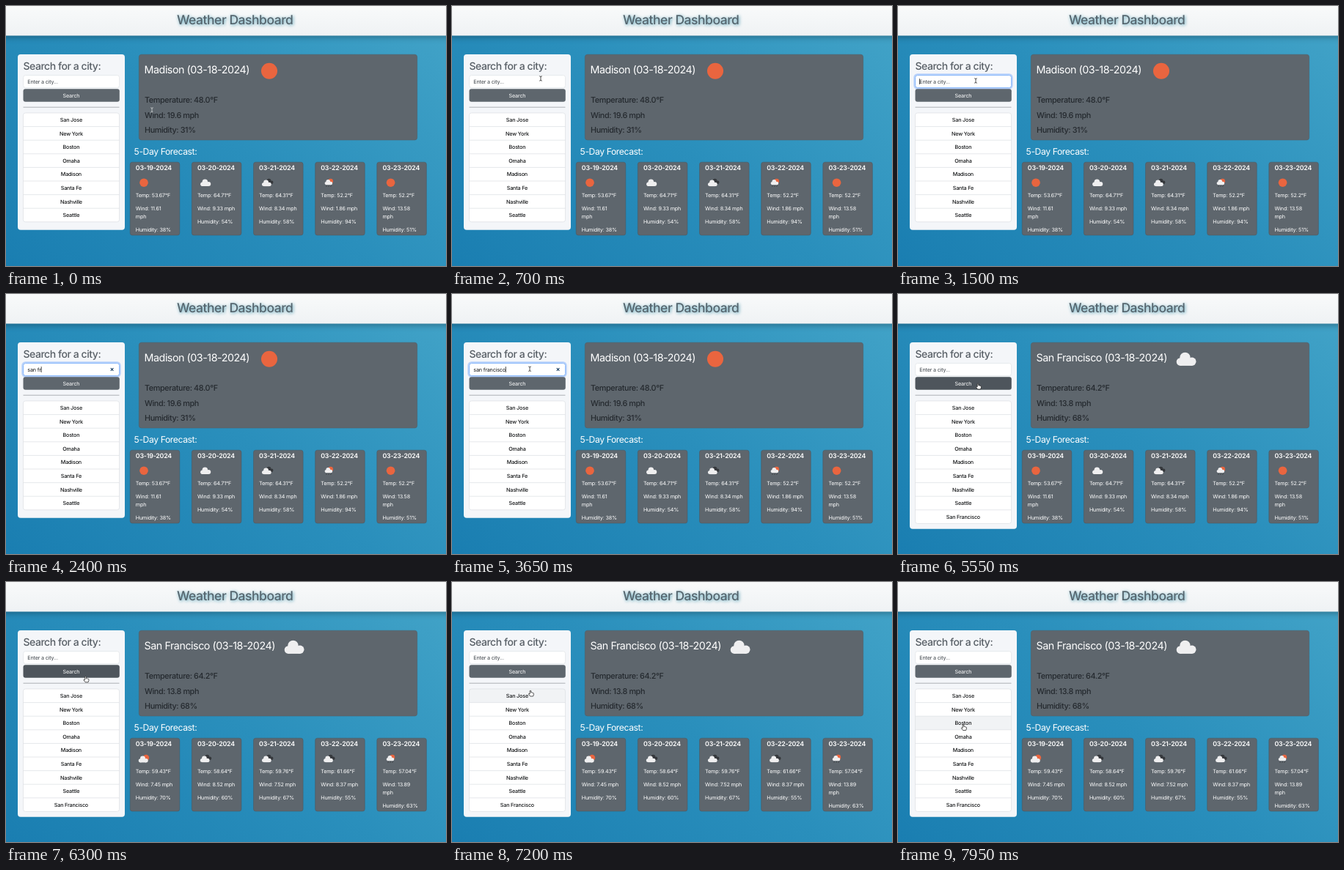
These frames come from a looping animation (600x355 px, 8 s). An HTML page:

```html
<!DOCTYPE html>
<html lang="en">
<head>
<meta charset="utf-8">
<title>Weather Dashboard</title>
<style>
  html, body { margin: 0; width: 100%; height: 100%; overflow: hidden; }
  body { background: linear-gradient(40deg, #1a7eb1, #2a8fbc 50%, #43a4c8); }
  svg { display: block; width: 600px; height: 355px; }
  text {
    font: 400 7.2px Inter, Roboto, sans-serif; font-optical-sizing: none;
    letter-spacing: -.17px; white-space: pre; text-rendering: geometricPrecision;
  }
  .title { font-size: 17.5px; font-weight: 500; letter-spacing: -.47px; fill: #55656e; text-shadow: 1px 1px 4px #4f9db3; }
  .heading { font-size: 14px; font-weight: 500; letter-spacing: -.45px; fill: #575e65; }
  .city { font-size: 14.3px; letter-spacing: -.47px; fill: #fff; }
  .detail { font-size: 10.8px; font-weight: 500; letter-spacing: -.38px; fill: #24292e; }
  .forecast { font-size: 12.2px; letter-spacing: -.42px; fill: #fff; }
  .date { font-size: 8.8px; font-weight: 600; letter-spacing: -.2px; fill: #fff; }
  .light { fill: #fff; }
  .dark { fill: #101214; }
  .row { font-weight: 500; }
  .hint { fill: #3c4248; }
  .middle { text-anchor: middle; }
  .header { filter: drop-shadow(0 2px 4px rgba(0, 0, 0, .3)); }
</style>
</head>
<body>
<svg viewBox="0 0 600 355">
  <defs>
    <linearGradient id="sheen" x2="0" y2="1">
      <stop stop-color="#fbfcfc"/><stop offset="1" stop-color="#eff2f4"/>
    </linearGradient>
  </defs>
  <rect class="header" x="-10" y="-10" width="620" height="50.5" fill="url(#sheen)"/>
  <text class="title middle" x="312.2" y="24.8">Weather Dashboard</text>
  <g id="scene"></g>
</svg>
<script>
const LOOP = 8000;
const FOCUS = 1200, TYPE_START = 1750, KEY_GAP = 125, BLUR = 5000, RESULT = 5350, FORECAST = 5600;
const QUERY = 'san francisco';
const LAST_KEY = TYPE_START + KEY_GAP * (QUERY.length - 1);
const ROW_TOP = 146, ROW_HEIGHT = 18.6;
const GREY = '#5e666d', ORANGE = '#e9653f';
const CITIES = ['San Jose', 'New York', 'Boston', 'Omaha', 'Madison', 'Santa Fe', 'Nashville', 'Seattle'];

const CURRENT = {
  before: { city: 'Madison', icon: 'sun', iconX: 359, temp: '48.0', wind: '19.6', humidity: 31 },
  after: { city: 'San Francisco', icon: 'cloud', iconX: 393, temp: '64.2', wind: '13.8', humidity: 68 }
};
// Each day: icon, temperature, wind, humidity
const DAYS = {
  before: [
    ['sun', '53.67', '11.61', 38], ['cloud', '64.71', '9.33', 54], ['broken', '64.31', '8.34', 58],
    ['shower', '52.2', '1.86', 94], ['sun', '52.2', '13.58', 51]
  ],
  after: [
    ['few', '59.43', '7.45', 70], ['broken', '58.64', '8.52', 60], ['broken', '59.76', '7.52', 67],
    ['broken', '61.66', '8.37', 55], ['shower', '57.04', '13.89', 63]
  ]
};

// Pointer stops: time, x, y
const PATH = [
  [0, 199, 142], [150, 199, 142], [700, 121, 99], [850, 106, 102], [3600, 106, 102], [4350, 109, 122],
  [6100, 109, 122], [6700, 107, 148], [7250, 107, 148], [7700, 89, 194.5], [LOOP, 89, 194.5]
];

const scene = document.getElementById('scene');
const clamp = v => Math.max(0, Math.min(1, v));
const ease = v => v * v * (3 - 2 * v);
const text = (x, y, cls, str) => `<text x="${x}" y="${y}" class="${cls}">${str}</text>`;
const box = (x, y, w, h, r, fill, stroke = 'none', extra = '') =>
  `<rect x="${x}" y="${y}" width="${w}" height="${h}" rx="${r}" fill="${fill}" stroke="${stroke}" ${extra}/>`;
const disc = (x, y, r, fill) => `<circle cx="${x}" cy="${y}" r="${r}" fill="${fill}"/>`;
const place = (x, y, s, body) => `<g transform="translate(${x} ${y}) scale(${s})">${body}</g>`;

const cloud = fill => disc(-4.2, 2, 2.8, fill) + disc(-.8, -1, 3.8, fill) + disc(4.1, 1.8, 3, fill) +
  box(-4.2, 1, 8.3, 3.8, 0, fill);
const white = cloud('#efeff0');
const ICONS = {
  sun: disc(0, 0, 5.8, ORANGE),
  cloud: white,
  broken: place(2.8, -1.8, .75, cloud('#35383c')) + place(-1, .6, .9, white),
  few: disc(3, -1.2, 4.2, ORANGE) + place(-.8, .8, .92, white),
  shower: disc(2.2, -2, 3.4, ORANGE) + place(-.6, -.6, .75, white) +
    '<path d="M-3 3.8l-.8 1.8M0 3.8l-.8 1.8M3 3.8l-.8 1.8" stroke="#35383c" stroke-width=".8"/>'
};

function pointerAt(t) {
  const i = PATH.findIndex((stop, k) => k && t <= stop[0]);
  const [t0, x0, y0] = PATH[i - 1], [t1, x1, y1] = PATH[i];
  const k = ease(clamp((t - t0) / (t1 - t0)));
  return { x: x0 + (x1 - x0) * k, y: y0 + (y1 - y0) * k };
}

function drawPointer({ x, y }, overLink) {
  const overInput = x < 155 && y > 94 && y < 113;
  if (overInput || x > 189) {
    return place(x, y, 1, '<path d="M-1.8-3.2Q0-3.2 0-2Q0-3.2 1.8-3.2M0-2V2M-1.8 3.2Q0 3.2 0 2Q0 3.2 1.8 3.2" ' +
      `fill="none" stroke="${overInput ? '#222' : '#d5d8da'}" stroke-width=".8"/>`);
  }
  const shape = overLink
    ? 'M-.8 .6Q0-.5 .8 .6V3Q1.6 2.4 2.2 3.2Q3 2.8 3.4 3.6Q4.4 3.4 4.4 4.5V5.8L3.6 8H-.4L-2.6 5Q-2.6 3.8-.8 4.8Z'
    : 'M0 0V7.5L1.8 5.9L2.9 8.4L4 7.9L2.9 5.5H5.3Z';
  return place(x, y, 1, `<path d="${shape}" fill="${overLink ? '#fff' : '#111'}" ` +
    `stroke="${overLink ? '#111' : '#fff'}" stroke-width=".7" stroke-linejoin="round"/>`);
}

function drawInput(t) {
  const focus = clamp((t - FOCUS) / 150) * (1 - clamp((t - BLUR) / 150));
  const count = t < TYPE_START || t >= RESULT ? 0
    : Math.min(QUERY.length, Math.floor((t - TYPE_START) / KEY_GAP) + 1);
  const typing = t >= TYPE_START && t < LAST_KEY;
  const blinkStart = t < TYPE_START ? FOCUS : LAST_KEY;
  const caret = t >= FOCUS && t < BLUR && (typing || (t - blinkStart) % 1060 < 530);
  return box(22.5, 93.5, 133, 19, 4, 'none', '#b9d2fb', `stroke-width="2.4" opacity="${focus}"`) +
    box(23.6, 94.6, 131, 17, 3, '#fff', '#dee2e6', 'stroke-width=".7"') +
    box(23.6, 94.6, 131, 17, 3, 'none', '#86b7fe', `opacity="${focus}"`) +
    (count ? `<text id="query" x="29.3" y="105.6" class="dark">${QUERY.slice(0, count)}</text>` +
      '<path d="M142.8 101.2l3.6 3.6m0-3.6l-3.6 3.6" stroke="#1d4266" stroke-width="1.2"/>'
      : text(29.3, 105.6, 'hint', 'Enter a city...')) +
    (caret ? '<path id="caret" d="M29.4 99.2v7.8" stroke="#111" stroke-width=".8"/>' : '');
}

function drawSearch(t, overButton, hoveredRow) {
  const done = t >= RESULT;
  const cities = done ? [...CITIES, 'San Francisco'] : CITIES;
  const height = ROW_HEIGHT * cities.length;
  let out = box(16, 66, 146, done ? 254.7 : 239.7, 4, '#f4f6f9') +
    text(23.4, 87.1, 'heading', 'Search for a city:') + drawInput(t) +
    box(23.5, 113.3, 131.3, 17.4, 3, overButton ? '#4e555c' : GREY) +
    text(89, 124.6, 'light middle', 'Search') +
    '<path d="M23.5 138.2h131" stroke="#8b9197" stroke-width=".7"/>' +
    box(23.5, ROW_TOP, 131, height, 3, '#fff');
  cities.forEach((city, i) => {
    const y = ROW_TOP + i * ROW_HEIGHT;
    if (i === hoveredRow) out += box(23.5, y, 131, ROW_HEIGHT, 1, '#f1f3f5');
    if (i) out += `<path d="M23.5 ${y}h131" stroke="#dcdfe3" stroke-width=".7"/>`;
    out += text(88.9, y + 11.9, 'dark row middle', city);
  });
  return out + box(23.5, ROW_TOP, 131, height, 3, 'none', '#dcdfe3', 'stroke-width=".7"');
}

function drawCurrent({ city, icon, iconX, temp, wind, humidity }) {
  return box(181.3, 66.2, 379.4, 116.8, 3.5, GREY, '#505b63', 'stroke-width=".5"') +
    text(188.6, 92.2, 'city', `${city} (03-18-2024)`) +
    place(iconX, 88.8, 1.9, ICONS[icon]) +
    text(189, 132.4, 'detail', `Temperature: ${temp}°F`) +
    text(189, 153, 'detail', `Wind: ${wind} mph`) +
    text(189, 173.4, 'detail', `Humidity: ${humidity}%`);
}

function drawDay([icon, temp, wind, humidity], i) {
  const x = 169.2 + i * 84.15, left = x + 7.6;
  const wraps = wind.length > 4;
  return box(x, 213.2, 67.6, 99.8, 3, GREY, '#4a555d', 'stroke-width=".5"') +
    text(left, 224, 'date', `03-${19 + i}-2024`) +
    place(x + 18.8, 241.2, 1, ICONS[icon]) +
    text(left, 260.6, 'light', `Temp: ${temp}°F`) +
    text(left, 278.8, 'light', `Wind: ${wind}${wraps ? '' : ' mph'}`) +
    (wraps ? text(left, 289.8, 'light', 'mph') : '') +
    text(left, wraps ? 307.8 : 297, 'light', `Humidity: ${humidity}%`);
}

function draw(t) {
  const pointer = pointerAt(t);
  const hidden = t >= TYPE_START && t < 3600;
  const overButton = pointer.x < 155 && pointer.y > 113.3 && pointer.y < 130.7;
  const hoveredRow = pointer.x < 155 && pointer.y >= ROW_TOP
    ? Math.floor((pointer.y - ROW_TOP) / ROW_HEIGHT) : -1;
  scene.innerHTML = drawSearch(t, overButton, hoveredRow) +
    drawCurrent(t < RESULT ? CURRENT.before : CURRENT.after) +
    text(174.6, 202.8, 'forecast', '5-Day Forecast:') +
    (t < FORECAST ? DAYS.before : DAYS.after).map(drawDay).join('') +
    (hidden ? '' : drawPointer(pointer, overButton || hoveredRow >= 0));

  const query = document.getElementById('query'), caret = document.getElementById('caret');
  if (query && caret) caret.setAttribute('transform', `translate(${query.getComputedTextLength() + .3})`);
}

const start = performance.now();
function tick() {
  draw((performance.now() - start) % LOOP);
  requestAnimationFrame(tick);
}
tick();
</script>
</body>
</html>
```
